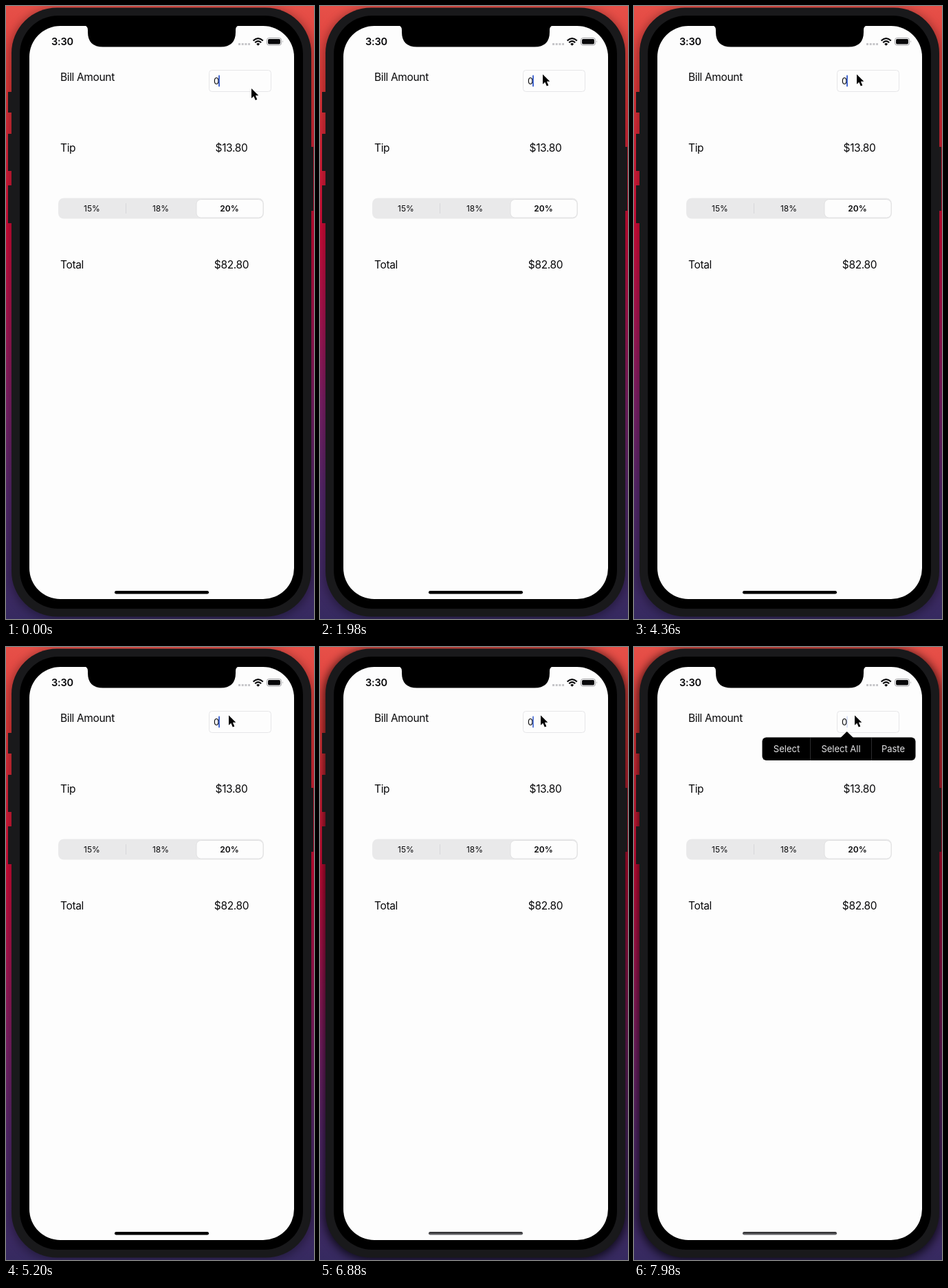
Recreate the animation shown at these times as an HTML page. Size 448x892 px, loop 8 s.

```html
<!DOCTYPE html>
<html lang="en">
<head>
<meta charset="utf-8">
<title>Tip calculator</title>
<style>
  html, body { margin: 0; width: 100%; height: 100%; overflow: hidden; background: #000; }
  svg { display: block; width: 100vw; height: 100vh; }
  text { font-family: Inter, Roboto, sans-serif; fill: #08080a; }
  .label { font-size: 15.5px; letter-spacing: -.35px; }
  .segment { font-size: 12px; }
  .amount, .menu { font-size: 13px; }
  .menu { fill: #e4e4e6; }
  .middle { text-anchor: middle; }
  .bold { font-weight: 600; }
</style>
</head>
<body>
<svg viewBox="0 0 448 892">
  <defs>
    <linearGradient id="wallpaper" x2="0" y2="1">
      <stop offset="0" stop-color="#e65048"/>
      <stop offset=".13" stop-color="#de3838"/>
      <stop offset=".36" stop-color="#d00c38"/>
      <stop offset=".5" stop-color="#ac1450"/>
      <stop offset=".65" stop-color="#7c2068"/>
      <stop offset=".8" stop-color="#54286c"/>
      <stop offset="1" stop-color="#362a60"/>
    </linearGradient>
    <linearGradient id="dimBar" x2="0" y2="1">
      <stop offset="0" stop-color="#222224"/>
      <stop offset="1" stop-color="#747478"/>
    </linearGradient>
    <filter id="blur" x="-10%" y="-10%" width="120%" height="120%">
      <feGaussianBlur stdDeviation="7"/>
    </filter>
    <filter id="softBlur" x="-40%" y="-40%" width="180%" height="180%">
      <feGaussianBlur stdDeviation="6"/>
    </filter>
  </defs>

  <rect width="448" height="892" fill="url(#wallpaper)"/>
  <rect id="shadow" x="6" y="4" width="440" height="888" rx="66" filter="url(#blur)"/>

  <!-- Phone body -->
  <g fill="#19191b">
    <path d="M3 125h6v30h-6zM3 186h6v54h-6zM3 261h6v55h-6zM443 205h4v93h-4z"/>
    <rect x="8" y="2.5" width="436" height="886" rx="66"/>
  </g>
  <rect x="20" y="14" width="412" height="863" rx="56"/>
  <rect x="34" y="29" width="385" height="834" rx="45" fill="#fdfdfd"/>
  <path d="M114 28.5Q119 29 119 35V38Q119 59.5 141 59.5H312Q334 59.5 334 38V35Q334 29 339 28.5Z"/>

  <g id="status">
    <text class="bold" x="66" y="57" font-size="14.5" letter-spacing="-.2">3:30</text>
    <path d="M338 55.5H355" stroke="#c6c6c9" stroke-width="3" stroke-dasharray="3 1.7"/>
    <g fill="none" stroke="#08080a" stroke-width="2.1">
      <path d="M359.6 50.4Q366.7 43.8 373.8 50.4"/>
      <path d="M362.2 53.2Q366.7 49.2 371.2 53.2"/>
    </g>
    <path d="M364.2 55.2Q366.7 53 369.2 55.2L366.7 57.8Z" fill="#08080a"/>
    <rect x="379.5" y="46.5" width="21" height="10.5" rx="3" fill="none" stroke="#a0a0a3"/>
    <rect x="381" y="48" width="18" height="7.5" rx="1.7" fill="#08080a"/>
    <path d="M402 50Q403.6 51.7 402 53.6Z" fill="#a0a0a3"/>
  </g>

  <g class="label">
    <text x="79" y="109">Bill Amount</text>
    <text x="79" y="212">Tip</text>
    <text x="79" y="382">Total</text>
    <text class="middle" x="328" y="212">$13.80</text>
    <text class="middle" x="328" y="382">$82.80</text>
  </g>

  <rect x="295.5" y="93.5" width="90" height="31" rx="4" fill="none" stroke="#e6e6e8"/>
  <text class="amount" x="302" y="114">0</text>
  <rect id="caret" x="309" y="100.5" width="2" height="17" rx="1" fill="#4468d0"/>

  <!-- Tip percentage -->
  <rect x="76" y="279.5" width="299" height="30" rx="8" fill="#e9e9ea"/>
  <path d="M174.5 287V302" stroke="#d8d8da"/>
  <rect x="277" y="281.5" width="97" height="26.5" rx="6.5" fill="#fdfdfd" stroke="#dcdcde" stroke-width=".8"/>
  <g class="segment middle">
    <text x="125" y="298.5">15%</text>
    <text x="225" y="298.5">18%</text>
    <text class="bold" x="325" y="298.5">20%</text>
  </g>

  <rect id="homeBar" x="158" y="851" width="137" height="4.5" rx="2.2"/>

  <g id="loupe">
    <rect x="264" y="84" width="92" height="50" rx="24" fill="#d4d4d8" opacity=".5" filter="url(#softBlur)"/>
    <rect x="266" y="85" width="88" height="46" rx="23" fill="#fdfdfd"/>
    <text class="amount" x="302" y="114">0</text>
    <rect x="309" y="100.5" width="2" height="17" rx="1" fill="#4468d0"/>
  </g>

  <g id="menu">
    <rect x="186.5" y="131.5" width="223" height="33.5" rx="6"/>
    <path d="M300.5 132L309.7 123L319 132Z"/>
    <path d="M256.5 132V165M345.5 132V165" stroke="#2c2c2e"/>
    <g class="middle">
      <text class="menu" x="222" y="153">Select</text>
      <text class="menu" x="301" y="153">Select All</text>
      <text class="menu" x="377" y="153">Paste</text>
    </g>
  </g>

  <path id="pointer" d="M0 0V14.3L3.3 11.2L5.8 17L8.3 15.9L5.9 10.3H10.3Z" stroke="#fff" paint-order="stroke"/>
</svg>
<script>
  const LOOP = 8000;
  const PRESS = 5650;      // pointer goes down and the window gains focus
  const LOUPE_IN = 6120;
  const RELEASE = 6520;
  const MENU_IN = 7020;

  const part = id => document.getElementById(id);
  const [shadow, status, caret, homeBar, loupe, menu, pointer] =
    ['shadow', 'status', 'caret', 'homeBar', 'loupe', 'menu', 'pointer'].map(part);

  const ramp = (t, from, to) => Math.min(1, Math.max(0, (t - from) / (to - from)));
  const ease = (t, from, to) => {
    const p = ramp(t, from, to);
    return p * p * (3 - 2 * p);
  };
  const mix = (a, b, p) => a + (b - a) * p;

  // One-second blink: solid, fade out, hidden, fade in.
  function caretOpacity(t) {
    if (t >= PRESS && t < RELEASE) return 1;
    const phase = (t < PRESS ? t : t - RELEASE + 60) % 1000;
    return Math.max(1 - ramp(phase, 400, 550), ramp(phase, 800, 950));
  }

  function draw(t) {
    const approach = ease(t, 400, 1150);
    const settle = ease(t, 5380, 5560);
    const x = mix(357, 324, approach) - 3 * settle;
    const y = mix(120, 99.5, approach);
    pointer.setAttribute('transform', `translate(${x} ${y})`);

    caret.setAttribute('opacity', caretOpacity(t));

    const focused = t >= PRESS;
    shadow.setAttribute('opacity', focused ? .75 : .35);
    homeBar.setAttribute('fill', focused ? 'url(#dimBar)' : '#000');

    const lift = ease(t, LOUPE_IN, LOUPE_IN + 180) * (1 - ease(t, RELEASE, RELEASE + 180));
    loupe.setAttribute('opacity', lift);
    loupe.setAttribute('transform', `translate(0 ${-34 * lift})`);

    const hidden = ramp(t, LOUPE_IN - 20, LOUPE_IN + 50) * (1 - ramp(t, RELEASE + 150, RELEASE + 280));
    status.setAttribute('opacity', 1 - hidden);

    menu.setAttribute('opacity', ramp(t, MENU_IN, MENU_IN + 150));
  }

  function frame() {
    draw(performance.now() % LOOP);
    requestAnimationFrame(frame);
  }
  frame();
</script>
</body>
</html>
```
